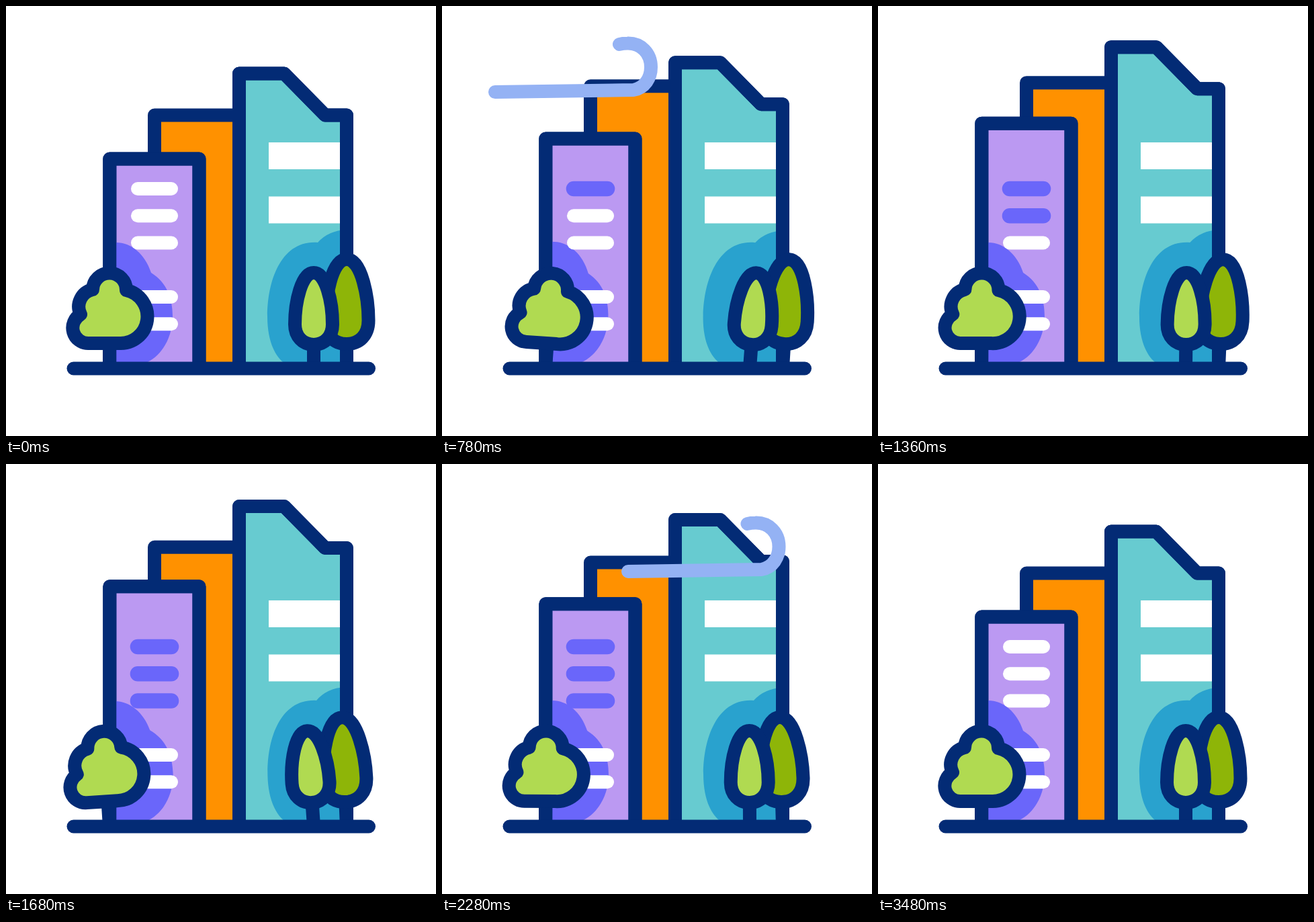
Write an HTML page that moves like this. It is 640x640 px and loops after 3.58 s.

```html
<!DOCTYPE html>
<html lang="en">
<head>
<meta charset="utf-8">
<title>City in the wind</title>
<style>
  html, body { margin: 0; height: 100%; overflow: hidden; background: #fff; }
  svg { display: block; width: 100vw; height: 100vh; }
  .line { stroke: #032b75; stroke-width: 20; stroke-linejoin: round; stroke-linecap: round; }
  .wind { fill: none; stroke: #94b2f4; stroke-width: 20; stroke-linecap: round; stroke-linejoin: round; }
</style>
</head>
<body>
<svg viewBox="0 0 640 640">
  <path id="orange" class="line" fill="#ff9100"/>

  <path id="purple" class="line" fill="#bb99f2"/>
  <path id="purpleShade" fill="#6a66fa" d="M154 352H164C186 352 207 369 216 397C240 412 248 436 248 462C248 495 230 523 206 532V540H154Z"/>
  <g id="windows"></g>
  <path id="purpleFrame" class="line" fill="none"/>

  <path id="teal" class="line" fill="#67cbd0"/>
  <path id="tealShade" fill="#29a2ce" d="M507 333Q480 334 464 352C410 348 389 408 389 462C389 498 400 522 416 533L507 540Z"/>
  <path fill="#fff" d="M391 203H507V243H391ZM391 283.500H507V323.500H391Z"/>
  <path id="tealFrame" class="line" fill="none"/>

  <g id="backTree" class="line">
    <path d="M507 503V539"/>
    <path fill="#8eb508" d="M507 377C484 377 475 436 475 468C475 490 488 503 507 503C526 503 539.500 490 539.500 468C539.500 436 530 377 507 377Z"/>
  </g>
  <g id="frontTree" class="line">
    <path d="M458 504V539"/>
    <path fill="#b0da51" d="M458 397C440 397 430 440 430 474C430 492 442 504 458 504C474 504 486 492 486 474C486 440 476 397 458 397Z"/>
  </g>
  <g id="bush" class="line">
    <path d="M154 502V539"/>
    <path fill="#b0da51" d="M123 502A23 23 0 0 1 111 459A26 26 0 0 1 129 422A25 25 0 0 1 179 423A40 40 0 0 1 168 502Z"/>
  </g>
  <path class="line" d="M100.500 539.500H540"/>

  <path class="wind" pathLength="1" d="M79 128L285 125C302 122 311 107 311 91C311 70 296 55 276 55.500Q269 55.500 264 57"/>
</svg>
<script>
const LOOP = 3580;
const el = id => document.getElementById(id);

// Eased interpolation through [time, value] keys
function track(t, keys) {
  const next = keys.findIndex(k => t < k[0]);
  if (next === 0) return keys[0][1];
  if (next < 0) return keys[keys.length - 1][1];
  const [t0, a] = keys[next - 1], [t1, b] = keys[next];
  const u = (t - t0) / (t1 - t0);
  return a + (b - a) * u * u * (3 - 2 * u);
}

const outlines = {
  orange: y => `M221 539V${y}H347V539`,
  purple: y => `M154.300 539V${y}H287.500V539`,
  teal: y => `M347 539V${y}H414L475 ${y + 62}H507V539`
};
const buildings = [
  { id: 'orange', top: [[230, 162.5], [990, 109.5], [3020, 162.5]] },
  { id: 'purple', top: [[230, 227.5], [1250, 174], [2980, 227.5]] },
  { id: 'teal', top: [[260, 100.5], [1450, 60.5], [2980, 100.5]] }
];

const sway = (angle, right, left, rightAgain) =>
  [[220, 0], [right, angle], [left, -angle], [rightAgain, angle], [3480, 0]];
const swaying = [
  { id: 'bush', keys: sway(4.4, 920, 1830, 2690), pivot: '154 539' },
  { id: 'frontTree', keys: sway(4.8, 940, 1850, 2740), pivot: '458 539' },
  { id: 'backTree', keys: sway(4.8, 1080, 1960, 2790), pivot: '507 539' },
  { id: 'purpleShade', keys: sway(2.4, 920, 1830, 2690), pivot: '193 445' },
  { id: 'tealShade', keys: sway(1.5, 940, 1850, 2740), pivot: '458 445' }
];

const lit = [[600, 2400], [1070, 2640], [1540, 2880]];
const bar = (y, grow, fill) =>
  `<rect x="${186 - grow}" y="${y - 10 - grow}" width="${70 + 2 * grow}" height="${20 + 2 * grow}" rx="${10 + grow}" fill="${fill}"/>`;
el('windows').innerHTML =
  [272, 312.3, 352.5, 433, 473.3].map(y => bar(y, 0, '#fff')).join('') +
  [272, 312.3, 352.5].map(y => bar(y, 1.3, '#6a66fa')).join('');
const litBars = [...el('windows').children].slice(5);

const gust = document.querySelector('.wind');
const gusts = [
  { start: 220, full: 780, end: 1340, shift: '0 0' },
  { start: 1700, full: 2230, end: 2790, shift: '190.5 32' }
];

function draw(t) {
  for (const { id, top } of buildings) {
    const d = outlines[id](track(t, top));
    el(id).setAttribute('d', d);
    el(id + 'Frame')?.setAttribute('d', d);
  }
  for (const { id, keys, pivot } of swaying)
    el(id).setAttribute('transform', `rotate(${track(t, keys)} ${pivot})`);

  lit.forEach(([on, off], i) => {
    litBars[i].style.display = t >= on && t < off ? '' : 'none';
  });

  const g = gusts.find(g => t > g.start && t < g.end);
  gust.style.display = g ? '' : 'none';
  if (g) {
    const head = track(t, [[g.start, 0], [g.full, 1]]);
    const tail = track(t, [[g.full, 0], [g.end, 1]]);
    gust.setAttribute('transform', `translate(${g.shift})`);
    gust.setAttribute('stroke-dasharray', `${head - tail} 3`);
    gust.setAttribute('stroke-dashoffset', -tail);
  }
}

const begin = performance.now();
function tick() {
  draw((performance.now() - begin) % LOOP);
  requestAnimationFrame(tick);
}
tick();
</script>
</body>
</html>
```
